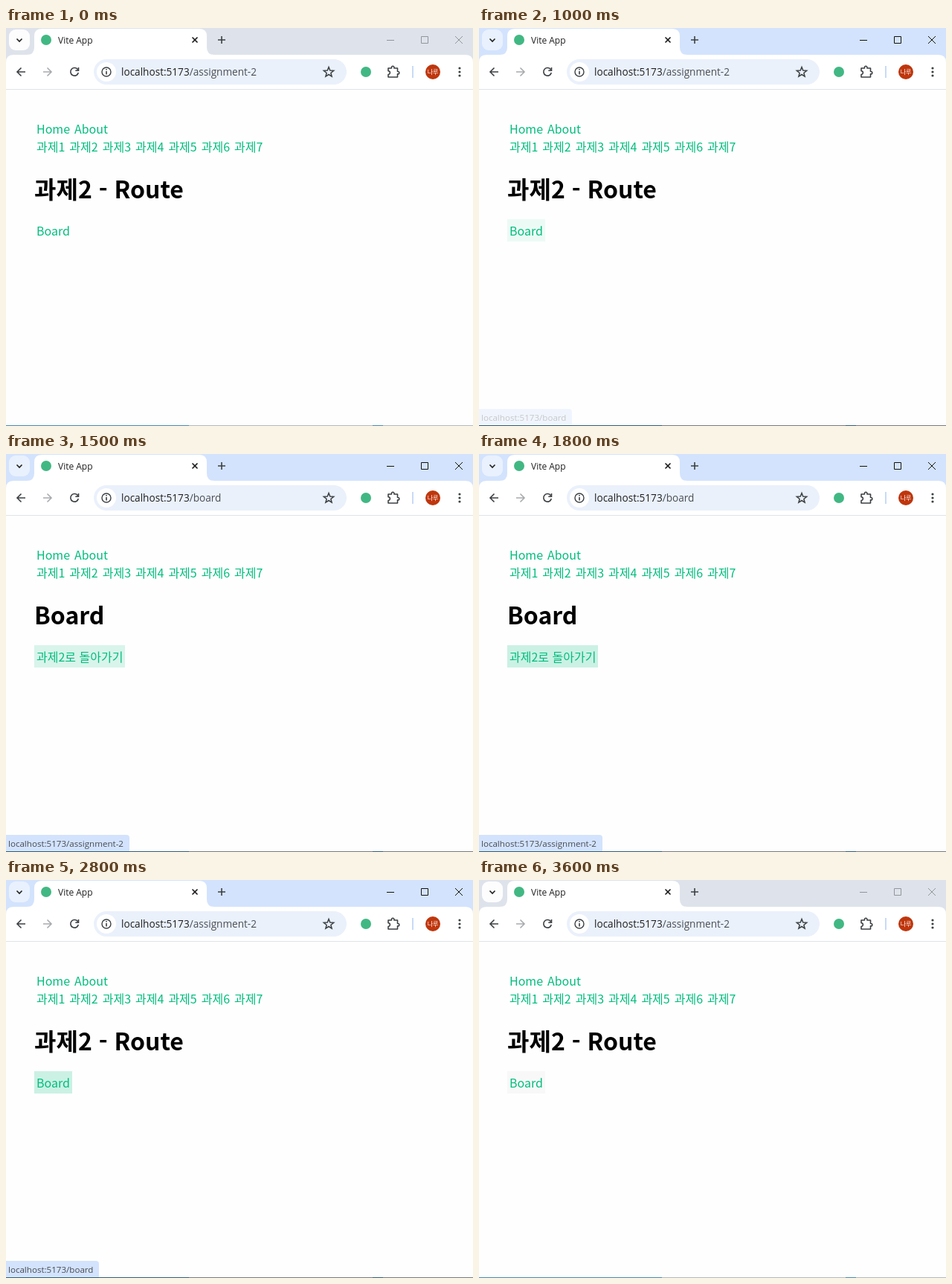
These frames come from a looping animation (628 by 535 pixels, 3700 ms). An HTML page:

```html
<!DOCTYPE html>
<html lang="ko">
<head>
<meta charset="utf-8">
<title>Vite App</title>
<style>
  html, body { margin: 0; width: 100%; height: 100%; overflow: hidden; background: #fefefe; }
  svg { display: block; width: 628px; height: 535px; }
  .ui { font-family: "Open Sans", "Noto Sans CJK KR", sans-serif; }
  .page { font-family: "Noto Sans CJK KR", "Noto Sans CJK", "Noto Sans KR", sans-serif; font-size: 16px; fill: #00bd7e; }
  .heading { font-size: 32px; font-weight: 700; fill: #000; }
  .icon { fill: none; stroke: #3c4043; stroke-width: 1.6; }
</style>
</head>
<body>
<svg viewBox="0 0 628 535">
  <rect width="628" height="535" fill="#fefefe"/>

  <!-- tab strip -->
  <rect id="strip" width="628" height="46"/>
  <rect id="tabSearch" x="4" y="2" width="28" height="28" rx="9"/>
  <path class="icon" stroke-width="1.8" d="M14.5 14.5 18 18l3.5-3.5" style="stroke:#1f1f1f"/>
  <path fill="#fff" d="M28 36q10 0 10-10V11q0-10 10-10h212q10 0 10 10v15q0 10 10 10z"/>
  <circle cx="54" cy="16" r="7" fill="#41b883"/>
  <text class="ui" x="70" y="21" font-size="12" fill="#1f1f1f">Vite App</text>
  <path class="icon" d="m250.5 12.5 7 7m0-7-7 7" style="stroke:#1f1f1f"/>
  <path class="icon" d="M285 16h10m-5-5v10"/>
  <path id="controls" fill="none" d="M512 16.5h10M558.5 11.5h9v9h-9zM604 11l10 10m0-10-10 10"/>

  <!-- toolbar -->
  <path fill="#fff" d="M0 46q0-10 10-10h608q10 0 10 10v36H0z"/>
  <path fill="#e1e3e6" d="M0 82h628v1H0z"/>
  <path class="icon" d="M26 59H15m5.5-5.5L15 59l5.5 5.5"/>
  <path class="icon" d="M50 59h11m-5.500-5.500L61 59l-5.500 5.500" style="stroke:#a9abae"/>
  <path class="icon" d="M96.600 56A5.300 5.300 0 1 0 97.300 60M97.500 53v4.200h-4.200"/>
  <rect x="118" y="42" width="340" height="34" rx="17" fill="#eaf1fb"/>
  <circle cx="135" cy="59" r="13" fill="#fff"/>
  <circle class="icon" cx="135" cy="59" r="6" style="stroke-width:1.4"/>
  <path class="icon" d="M135 58v4.500M135 55v1.600"/>
  <text class="ui" x="155" y="64" font-size="13.6" fill="#1f1f1f">localhost:5173<tspan id="path" fill="#4b4f55"></tspan></text>
  <path id="star" class="icon" style="stroke-width:1.5"/>
  <circle cx="484" cy="59" r="7" fill="#41b883"/>
  <path class="icon" stroke-linejoin="round" d="M514 54h4.500v-1a1.700 1.700 0 0 1 3.400 0v1h4.600v4.500h.6a1.700 1.700 0 0 1 0 3.400h-.6V66H514v-3.500a2.300 2.300 0 0 0 0-4.800z"/>
  <path fill="#c7daf6" d="M546 51h2v16h-2z"/>
  <circle cx="574" cy="59" r="10" fill="#bf360c"/>
  <text class="ui" x="574" y="62" font-size="8" text-anchor="middle" fill="#fff">나루</text>
  <g fill="#3c4043"><circle cx="610" cy="54" r="1.600"/><circle cx="610" cy="59" r="1.600"/><circle cx="610" cy="64" r="1.600"/></g>

  <!-- page -->
  <g class="page">
    <text x="41" y="142">Home</text>
    <text x="92" y="142">About</text>
    <g id="tasks"></g>
    <text id="heading" class="heading" x="38" y="229"></text>
    <rect id="hover" x="38" y="257" height="30"/>
    <text id="link" x="41" y="279"></text>
  </g>

  <!-- link status bubble -->
  <g id="status" class="ui">
    <path id="bubble" fill="#d3e3fd"/>
    <text id="statusText" x="3" y="528" font-size="11.580" fill="#474b52"></text>
  </g>

  <!-- window edge -->
  <path id="edgeBlue" d="M0 534h246v1H0zM493 534h14v1h-14z"/>
  <path id="edgeGrey" d="M246 534h247v1H246zM507 534h121v1H507z"/>
</svg>
<script>
const LOOP = 3700, STEP = 100;
const el = id => document.getElementById(id);
const set = (id, attrs) => {
  for (const name in attrs) el(id).setAttribute(name, attrs[name]);
};

const pages = {
  task: { path: "/assignment-2", heading: "과제2 - Route", link: "Board", hoverWidth: 51, target: "/board", bubbleWidth: 125 },
  board: { path: "/board", heading: "Board", link: "과제2로 돌아가기", hoverWidth: 122, target: "/assignment-2", bubbleWidth: 166 }
};

// Each key is [time, value]; a value holds until the next key.
const hoverKeys = [[0, 0], [1000, .07], [1100, .15], [1200, .2], [1400, .07], [1500, .15], [1600, .2],
  [2500, .07], [2600, .2], [3100, .13], [3200, .04], [3300, 0]];
const statusKeys = [[0, 0], [1000, .3], [1100, .8], [1200, 1], [3300, .7], [3400, .3], [3500, 0]];
const valueAt = (keys, time) => keys.filter(key => key[0] <= time).pop()[1];

el("tasks").innerHTML = Array.from({ length: 7 }, (_, i) =>
  `<text x="${41 + i * 44.35}" y="166">과제${i + 1}</text>`).join("");

const starPoints = Array.from({ length: 10 }, (_, i) => {
  const angle = i * Math.PI / 5 - Math.PI / 2, radius = i % 2 ? 3 : 7;
  return `${434 + radius * Math.cos(angle)} ${59.5 + radius * Math.sin(angle)}`;
});
set("star", { d: `M${starPoints.join("L")}z` });

function draw(time) {
  const active = time >= 400 && time < 3600;
  const page = time >= 1400 && time < 2500 ? pages.board : pages.task;

  set("strip", { fill: active ? "#d3e3fd" : "#dee3eb" });
  set("tabSearch", { fill: active ? "#e9f1fe" : "#fdfdfe" });
  set("controls", { stroke: active ? "#111" : "#92959a" });
  set("edgeBlue", { fill: active ? "#315d78" : "#4a8ab0" });
  set("edgeGrey", { fill: active ? "#777a7e" : "#b5b8bc" });

  el("path").textContent = page.path;
  el("heading").textContent = page.heading;
  el("link").textContent = page.link;
  el("statusText").textContent = "localhost:5173" + page.target;
  set("bubble", { d: `M0 512h${page.bubbleWidth - 4}q4 0 4 4v18H0z` });
  set("status", { opacity: valueAt(statusKeys, time) });

  const leaving = time >= 3600;
  set("hover", {
    width: page.hoverWidth,
    fill: leaving ? "#f8f8f8" : "#00bd7e",
    opacity: leaving ? 1 : valueAt(hoverKeys, time)
  });
}

function tick() {
  const time = performance.now() % LOOP;
  draw(Math.floor(time / STEP) * STEP);
  requestAnimationFrame(tick);
}
tick();
</script>
</body>
</html>
```
